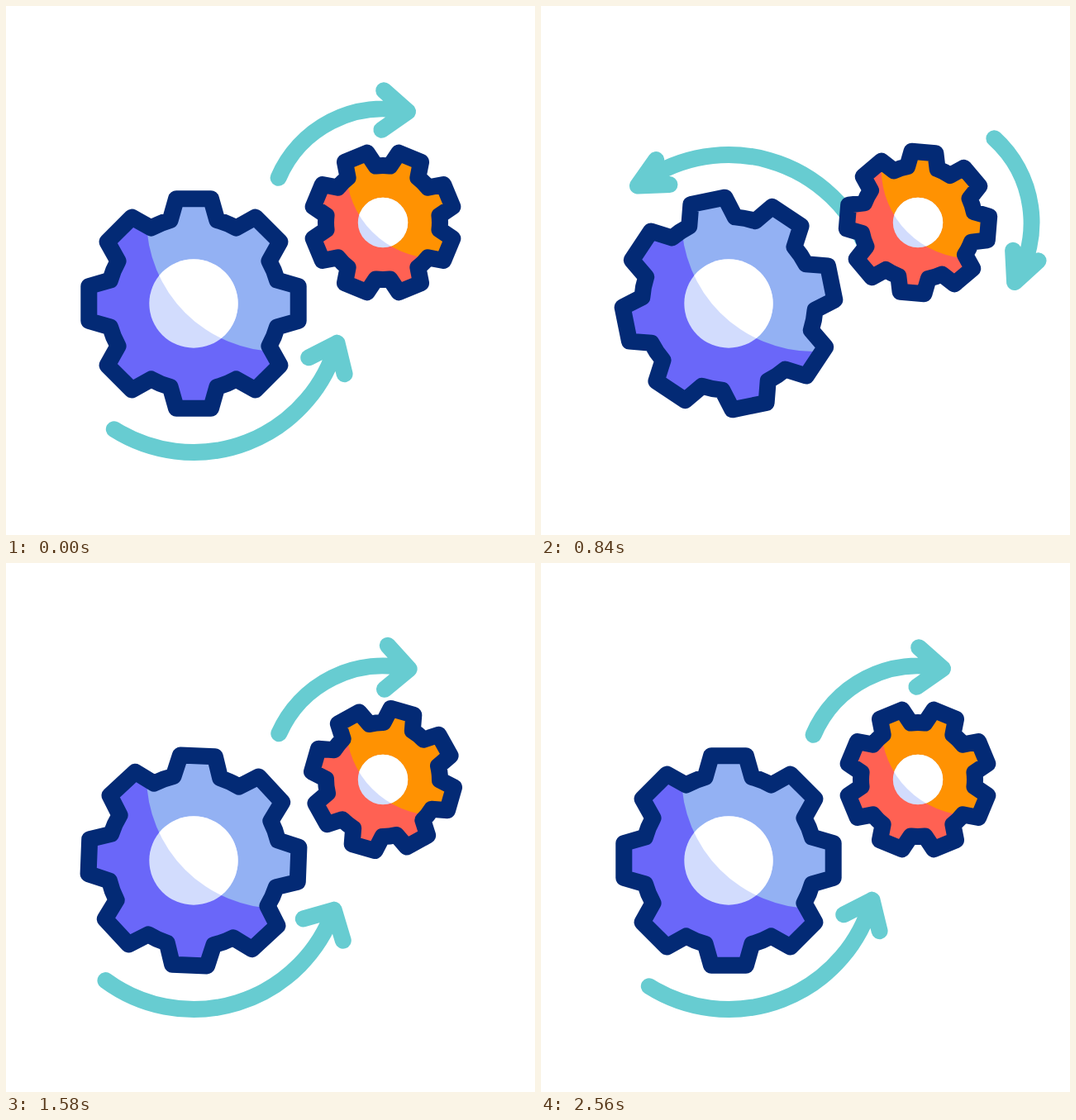
Recreate the animation shown at these times as an HTML page. Size 640 px wide and 640 px high, loop 3000 ms.

```html
<!DOCTYPE html>
<html lang="en">
<head>
<meta charset="utf-8">
<title>Turning gears</title>
<style>
  html, body { margin: 0; width: 100%; height: 100%; overflow: hidden; background: #fff; }
  svg { display: block; width: 100%; height: 100%; }
  .line { fill: none; stroke-width: 20; stroke-linecap: round; stroke-linejoin: round; }
  .arrow { stroke: #67ccd1; }
  .rim { stroke: #032a75; }
</style>
</head>
<body>
<svg id="stage" viewBox="0 0 640 640"></svg>
<script>
const LOOP = 3000, STEP = 20;
const stage = document.getElementById('stage');
const rad = deg => deg * Math.PI / 180;
const polar = (r, deg) => [r * Math.cos(rad(deg)), r * Math.sin(rad(deg))];
const point = p => p.map(v => v.toFixed(2)).join(' ');

function add(parent, tag, attrs) {
  const el = document.createElementNS('http://www.w3.org/2000/svg', tag);
  for (const key in attrs) el.setAttribute(key, attrs[key]);
  return parent.appendChild(el);
}

// Smooth curve through [time, value] keys that never overshoots a key
function track(keys) {
  const slope = i => (keys[i + 1][1] - keys[i][1]) / (keys[i + 1][0] - keys[i][0]);
  const tangent = keys.map((k, i) => {
    if (i === 0 || i === keys.length - 1) return 0;
    const a = slope(i - 1), b = slope(i);
    return a * b > 0 ? 2 * a * b / (a + b) : 0;
  });
  return t => {
    if (t <= keys[0][0]) return keys[0][1];
    const i = keys.findIndex(k => k[0] >= t) - 1;
    if (i < 0) return keys[keys.length - 1][1];
    const [t0, a] = keys[i], [t1, b] = keys[i + 1];
    const h = t1 - t0, u = (t - t0) / h, v = 1 - u;
    return (1 + 2 * u) * v * v * a + u * v * v * h * tangent[i]
      + u * u * (3 - 2 * u) * b - u * u * v * h * tangent[i + 1];
  };
}

// Outline with eight teeth: half widths and heights of tip and base
function gearPath({ tip, tipHalf, base, baseHalf, first }) {
  const valley = Math.hypot(base, baseHalf);
  let d = '';
  for (let i = 0; i < 8; i++) {
    const a = rad(first + i * 45), c = Math.cos(a), s = Math.sin(a);
    const at = (x, y) => point([x * c + y * s, x * s - y * c]);
    d += i ? `A${valley} ${valley} 0 0 1 ` : 'M';
    d += `${at(-baseHalf, base)}L${at(-tipHalf, tip)}L${at(tipHalf, tip)}L${at(baseHalf, base)}`;
    if (i === 7) {
      const e = rad(first), ec = Math.cos(e), es = Math.sin(e);
      d += `A${valley} ${valley} 0 0 1 ${point([-baseHalf * ec + base * es, -baseHalf * es - base * ec])}Z`;
    }
  }
  return d;
}

function makeGear(g) {
  const root = add(stage, 'g', { transform: `translate(${g.x} ${g.y})` });
  const clip = add(root, 'clipPath', { id: g.id });
  add(clip, 'circle', { cx: g.light[0] - g.x, cy: g.light[1] - g.y, r: g.light[2] });
  const d = gearPath(g);
  const lit = () => add(root, 'g', { 'clip-path': `url(#${g.id})` });
  const dark = add(root, 'path', { d, fill: g.dark });
  const bright = add(lit(), 'path', { d, fill: g.bright });
  add(root, 'circle', { r: g.hole, fill: '#d2dcfd' });
  add(lit(), 'circle', { r: g.hole, fill: '#fff' });
  const rim = add(root, 'path', { d, class: 'line rim' });
  const parts = [dark, bright, rim];
  return t => parts.forEach(p => p.setAttribute('transform', `rotate(${g.turn(t)})`));
}

// dir is 1 for clockwise, -1 for counter-clockwise
function makeArrow({ x, y, r, tail, head, dir, turn, spread }) {
  const path = add(stage, 'path', { class: 'line arrow' });
  const start = polar(r, tail), tip = polar(r, head);
  const barb = (angle, side) => {
    const [back, out] = polar(38.5, angle);
    const [c, s] = polar(1, head);
    return [
      tip[0] + dir * back * s + side * out * c,
      tip[1] - dir * back * c + side * out * s
    ];
  };
  return t => {
    const open = spread(t);
    path.setAttribute('d',
      `M${point(start)}A${r} ${r} 0 0 ${dir > 0 ? 1 : 0} ${point(tip)}` +
      `M${point(barb(47.5 + open, -1))}L${point(tip)}L${point(barb(29 + open, 1))}`);
    path.setAttribute('transform', `translate(${x} ${y}) rotate(${turn(t)})`);
  };
}

const big = { x: 227, y: 360 }, small = { x: 456, y: 262 };

const parts = [
  makeArrow({
    ...big, r: 180, tail: 122.3, head: 15.4, dir: -1,
    turn: track([[200, 0], [420, 4], [660, -25], [740, -66], [980, -248.5],
      [1260, -356], [1420, -361], [1580, -356], [2000, -359.7], [2560, -360]]),
    spread: track([[200, 0], [400, 6], [640, -12], [1260, -11.5], [1580, 7], [2000, 3], [2560, 0]])
  }),
  makeArrow({
    ...small, r: 137.5, tail: -156.8, head: -77.4, dir: 1,
    turn: track([[200, 0], [420, -3], [660, 27.4], [740, 59], [980, 183.9],
      [1260, 320.7], [1440, 358.5], [1580, 360.7], [2000, 361.5], [2560, 360]]),
    spread: track([[200, 0], [400, 6], [640, -13], [1260, -12.5], [1580, 5.5], [2000, 1.5], [2560, 0]])
  }),
  makeGear({
    ...big, id: 'bigLight', hole: 53.7, light: [330, 258, 160],
    tip: 126.7, tipHalf: 21, base: 101, baseHalf: 28.3, first: 0,
    dark: '#6a67f9', bright: '#93b1f3',
    turn: track([[200, 0], [660, -25.7], [980, -252.8], [1260, -330],
      [1580, -357.8], [2000, -355.8], [2560, -360]])
  }),
  makeGear({
    ...small, id: 'smallLight', hole: 30.2, light: [520, 197, 108.3],
    tip: 85.3, tipHalf: 14.5, base: 66.5, baseHalf: 18.3, first: 22.5,
    dark: '#ff6153', bright: '#ff9202',
    turn: track([[200, 0], [660, -6], [980, 164.3], [1260, 304.5],
      [1580, 353.4], [2000, 356.3], [2560, 360]])
  })
];

const begin = performance.now();
function draw() {
  const t = (performance.now() - begin) % LOOP;
  const frame = Math.floor(t / STEP) * STEP;
  parts.forEach(update => update(frame));
  requestAnimationFrame(draw);
}
draw();
</script>
</body>
</html>
```
